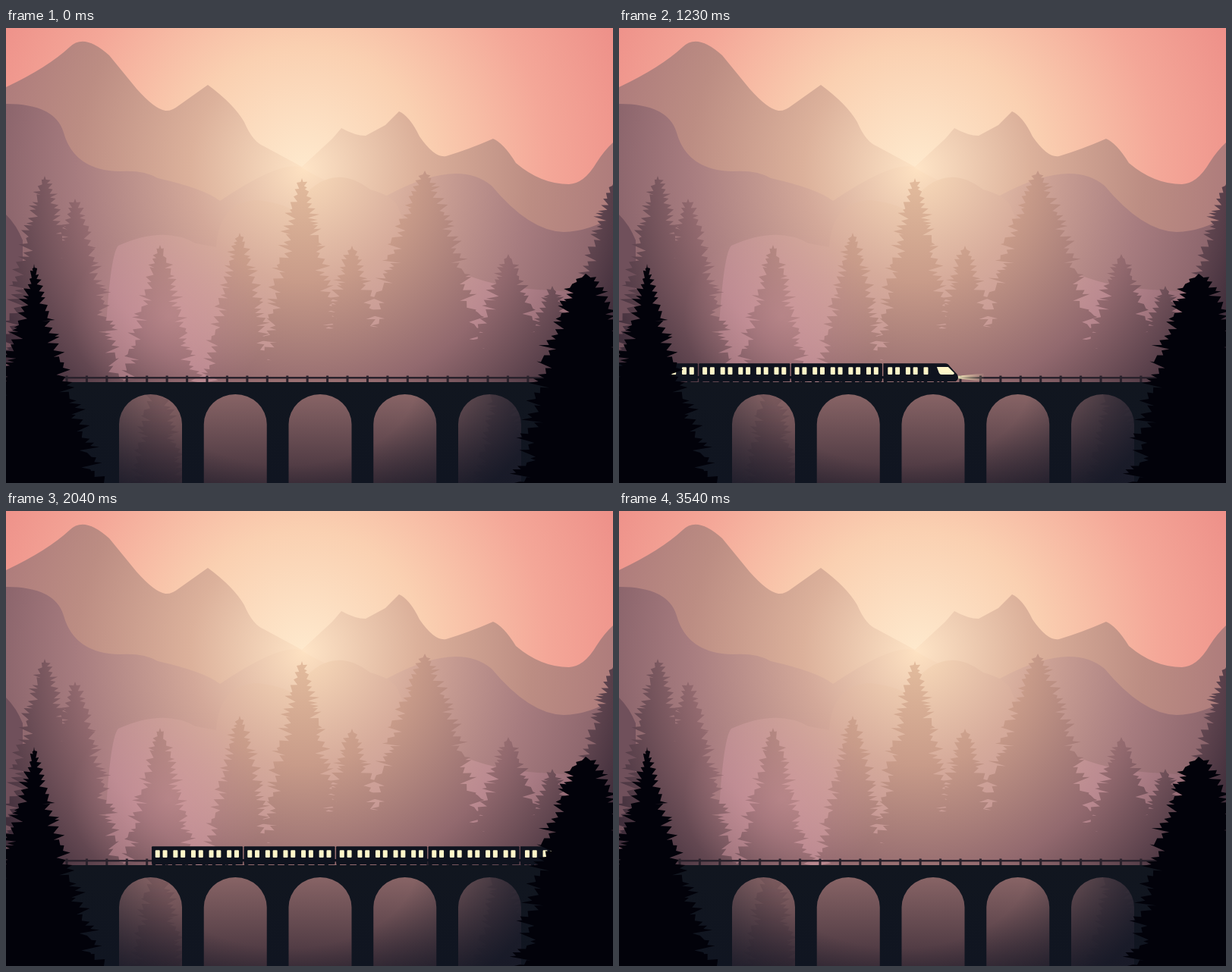
Write an HTML page with a canvas that moves like this. It is 800 px wide and 600 px high and loops after 4.38 s.

```html
<!DOCTYPE html>
<html lang="en">
<head>
<meta charset="utf-8">
<title>Train at sunset</title>
<style>
html, body { margin: 0; width: 100%; height: 100%; overflow: hidden; background: #000; }
canvas { display: block; }
</style>
</head>
<body>
<canvas id="stage" width="800" height="600"></canvas>
<script>
const W = 800, H = 600, LOOP = 4380, STEP = 30, SPEED = 0.407;
const DECK = 467, CAR = 121.5, DARK = '#0f131e', LIT = '#fff6c9';
const ctx = document.getElementById('stage').getContext('2d');

const layer = paint => {
  const c = document.createElement('canvas');
  c.width = W; c.height = H;
  paint(c.getContext('2d'));
  return c;
};

const random = seed => () => (seed = (seed * 16807) % 2147483647) / 2147483647;

// Spread colours evenly over a gradient
const stops = (f, colors) => {
  colors.forEach((c, i) => f.addColorStop(i / (colors.length - 1), c));
  return f;
};
const glow = (g, colors, r = 450) =>
  stops(g.createRadialGradient(393, 185, 0, 393, 185, r), colors.split(' '));
const fade = (g, y0, y1, ...colors) => stops(g.createLinearGradient(0, y0, 0, y1), colors);

// Soft ellipse, shaded from radius r0 to r1
const halo = (g, x, y, sy, r0, r1, ...colors) => {
  g.save();
  g.translate(x, y);
  g.scale(1, sy);
  g.fillStyle = stops(g.createRadialGradient(0, 0, r0, 0, 0, r1), colors);
  g.fillRect(-W, -H, 2 * W, 2 * H);
  g.restore();
};

const fillPath = (g, d, fill) => {
  g.fillStyle = fill;
  g.fill(new Path2D(d));
};

const WOOD = '#e6bf9f #c89b89 #92696e #402e3b';
const RIDGES = [
  ['#fee4c6 #dcb19b #bc8d83 #a97679',
    `M0,78Q55,52 84,25Q103,6 136,36L172,80Q196,107 210,109Q218,110 228,102L266,75
    Q300,100 314,124Q325,150 340,156L390,183L430,146L442,132Q460,142 474,142L500,128
    L518,110Q532,116 545,143Q565,172 580,169Q610,160 642,146Q656,152 672,178
    Q705,206 742,206Q762,205 778,178Q788,162 800,151V600H0Z`],
  ['#fee2c2 #d3a899 #a77c7f #7f5a63',
    `M0,100Q65,100 76,138Q90,188 150,189Q182,187 200,198Q262,212 282,228
    Q374,166 396,188Q440,214 500,222Q595,170 640,208Q690,268 735,269Q770,268 800,248V600H0Z`],
  ['#fadcba #d6ab9b #ba8990 #7e5864',
    `M130,430Q136,300 148,287Q208,260 250,284L277,289Q281,228 332,227Q360,230 378,240
    Q424,170 480,213Q514,222 518,240Q560,342 720,346L800,352V600H0V470Z`],
  ['#70505b', 'M0,246Q14,260 22,280V600H0Z']
];

// x, top and half width at the foot
const WOODS = [
  [390, 198, 60], [456, 287, 54], [552, 188, 94], [308, 270, 50], [203, 286, 50],
  [720, 340, 48], [662, 298, 60], [51, 195, 66], [91, 225, 64], [801, 203, 72]
];

// Half width grows with height to the given power, in tiers of ragged branches
const tree = (g, [x, top, spread], base, fill, seed, power = 0.7) => {
  const rnd = random(seed), tier = 24 + rnd() * 8;
  const side = dir => {
    const pts = [];
    for (let y = top + 5; y < base; y += 4 + rnd() * 6) {
      const droop = (y - top) % tier / tier;
      const edge = spread * ((y - top) / (base - top)) ** power * (0.78 + 0.32 * droop);
      const depth = Math.min(edge * 0.5, 3 + rnd() * 9);
      pts.push([x + dir * (edge - depth), y]);
      pts.push([x + dir * (edge + rnd() * 5), y - 1 + rnd() * 4]);
    }
    return pts;
  };
  const right = side(1), left = side(-1).reverse();
  g.beginPath();
  [[x, top], ...right, [x + spread, base], [x - spread, base], ...left].forEach(p => g.lineTo(...p));
  g.fillStyle = fill;
  g.fill();
};

const back = layer(g => {
  g.fillStyle = glow(g, '#fee9cd #fad0b1 #f4a798 #ec8a85', 480);
  g.fillRect(0, 0, W, H);
  for (const [colors, d] of RIDGES) fillPath(g, d, colors.includes(' ') ? glow(g, colors) : colors);
  const wood = glow(g, WOOD);
  WOODS.forEach((t, i) => tree(g, t, DECK, wood, 770 + i * 913));
  halo(g, 215, 380, 0.9, 0, 130, 'rgba(214,154,162,.42)', 'rgba(214,154,162,0)');

  // Valley below the deck
  g.save();
  g.beginPath();
  g.rect(0, DECK, W, H);
  g.clip();
  g.fillStyle = fade(g, 475, 600, '#8c6768', '#45333d');
  g.fillRect(0, DECK, W, H);
  tree(g, [200, 440, 36], 600, 'rgba(48,32,44,.14)', 31);
  tree(g, [655, 450, 40], 600, 'rgba(48,32,44,.14)', 608);
  halo(g, 370, 470, 0.625, 170, 340, 'rgba(20,24,38,0)', 'rgba(20,24,38,.9)');
  g.restore();

  // Railing
  g.fillStyle = '#2a222c';
  g.fillRect(70, 460, 650, 2.5);
  for (let x = 80; x < 720; x += 26.43) g.fillRect(x - 1.5, 458.5, 3, 9);
});

const front = layer(g => {
  // Viaduct with five arches
  g.beginPath();
  g.rect(0, DECK, W, H - DECK);
  for (let i = 0; i < 5; i++) {
    const x = 190.5 + i * 111.75;
    g.moveTo(x - 41.5, 600);
    g.ellipse(x, 522.5, 41.5, 39.5, 0, Math.PI, 2 * Math.PI);
    g.lineTo(x + 41.5, 600);
    g.closePath();
  }
  g.fillStyle = fade(g, DECK, 600, '#11161f', '#101521');
  g.fill('evenodd');
  tree(g, [37, 311, 92], 600, '#02020a', 411, 1);
  tree(g, [764, 324, 94], 600, '#02020a', 905, 0.52);
});

const panes = (x, n) => {
  ctx.fillStyle = LIT;
  ctx.beginPath();
  for (let i = 0; i < n; i++) {
    ctx.roundRect(x + (i >> 1) * 23.6 + (i % 2) * 9.8, 447.3, 6, 9.8, 1);
  }
  ctx.fill();
};

const wheels = (x, len) => {
  ctx.fillStyle = DARK;
  for (let dx = 1; dx < len - 3; dx += 13.2) ctx.fillRect(x + dx, 466, 4.5, 1);
};

// x is the rear end of the engine
const train = x => {
  for (let i = 1; i <= 4; i++) {
    const cx = x - i * CAR;
    ctx.fillStyle = DARK;
    ctx.beginPath();
    ctx.roundRect(cx + 0.5, 442.3, CAR - 1.5, 23.7, 1);
    ctx.fill();
    ctx.fillRect(cx + CAR - 2, 459, 3, 3);
    wheels(cx, CAR);
    panes(cx + 5.2, 10);
  }
  ctx.save();
  ctx.translate(x, 0);
  const beam = stops(ctx.createLinearGradient(97, 0, 133, 0),
    ['rgba(255,248,200,.95)', 'rgba(255,238,190,.45)', 'rgba(255,230,185,.05)']);
  fillPath(ctx, 'M96,459L133,455.5V466L96,462Z', beam);
  fillPath(ctx, 'M.5,442.3H82Q86,442.5 88,446L98,457Q101,463 96,466H.5Z', DARK);
  fillPath(ctx, 'M71,447H86L94,455Q94,457 92,457H77Q75,457 74,455Z', LIT);
  ctx.restore();
  wheels(x, 94);
  panes(x + 6.4, 5);
};

const start = performance.now();
const draw = () => {
  const t = Math.floor((performance.now() - start) % LOOP / STEP) * STEP;
  ctx.drawImage(back, 0, 0);
  if (t < 3540) train(238 + SPEED * (t - 960));
  ctx.drawImage(front, 0, 0);
  requestAnimationFrame(draw);
};
draw();
</script>
</body>
</html>
```
